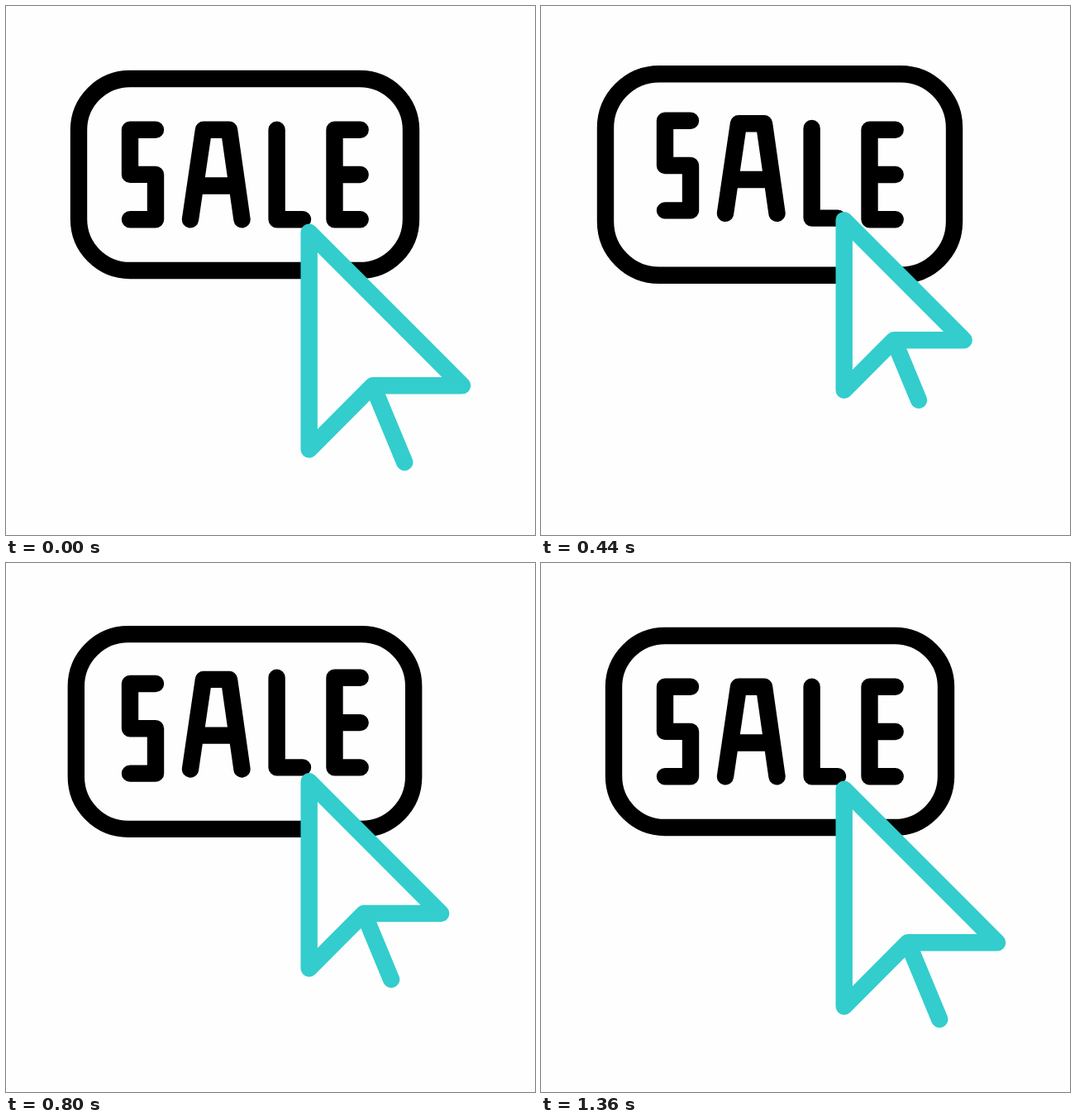
Write an HTML page that moves like this. It is 640 px wide and 640 px high and loops after 1.52 s.

```html
<!DOCTYPE html>
<html lang="en">
<head>
<meta charset="utf-8">
<title>Sale button</title>
<style>
  html, body { margin: 0; width: 100%; height: 100%; overflow: hidden; background: #fefefe; }
  svg { display: block; width: 100%; height: 100%; }
  path, rect { fill: none; stroke: #000; stroke-width: 20.4; stroke-linecap: round; stroke-linejoin: round; }
  #cursor path { stroke: #33cdcd; }
  #cursor #arrow { fill: #fefefe; }
</style>
</head>
<body>
<svg viewBox="0 0 640 640">
  <rect id="button"/>
  <g id="letters">
    <path d="M181 149.7H150V203.9H181V258.3H150"/>
    <path d="M223 258.3L239 149.7H270L285.5 258.3M233 217.5H275"/>
    <path d="M327.6 149.7V258.3H359"/>
    <path d="M428.7 149.7H397.5V258.3H428.7M397.5 204H428.7"/>
  </g>
  <g id="cursor">
    <path id="tail"/>
    <path id="arrow"/>
  </g>
</svg>
<script>
const LOOP = 1520, STEP = 40;
const $ = id => document.getElementById(id);
const button = $('button'), arrow = $('arrow'), tail = $('tail');
const letters = [...$('letters').children];

const ease = (t, start, length) => {
  const x = Math.min(1, Math.max(0, (t - start) / length));
  return x * x * (3 - 2 * x);
};

// Rises to 1, holds, then falls back to 0.
const pulse = (t, up, upLength, down, downLength) =>
  ease(t, up, upLength) - ease(t, down, downLength);

function drawButton(p) {
  const s = 1 + 0.061 * p, w = 402 * s, h = 232 * s;
  const box = { x: 289 - w / 2, y: 204 - h / 2, width: w, height: h, rx: 62 * s };
  for (const key in box) button.setAttribute(key, box[key]);
}

function drawCursor(p) {
  const s = 1 - 0.234 * p, top = 273.6 - 15.6 * p;
  const at = (x, y) => `${366.7 + x * s} ${top + y * s}`;
  const notch = at(77, 185.6);
  arrow.setAttribute('d', `M${at(0, 0)}L${at(0, 263)}L${notch}L${at(185.4, 185.6)}Z`);
  tail.setAttribute('d', `M${notch}L${at(115.5, 278.4)}`);
}

function draw(t) {
  drawButton(pulse(t, 240, 275, 600, 300));
  drawCursor(pulse(t, 100, 405, 600, 460));
  letters.forEach((letter, i) => {
    const lift = 10.9 * pulse(t, 120 + 120 * i, 320, 580 + 120 * i, 360);
    letter.setAttribute('transform', `translate(0 ${-lift})`);
  });
}

const start = performance.now();
function tick() {
  const t = (performance.now() - start) % LOOP;
  draw(Math.floor(t / STEP) * STEP);
  requestAnimationFrame(tick);
}
tick();
</script>
</body>
</html>
```
